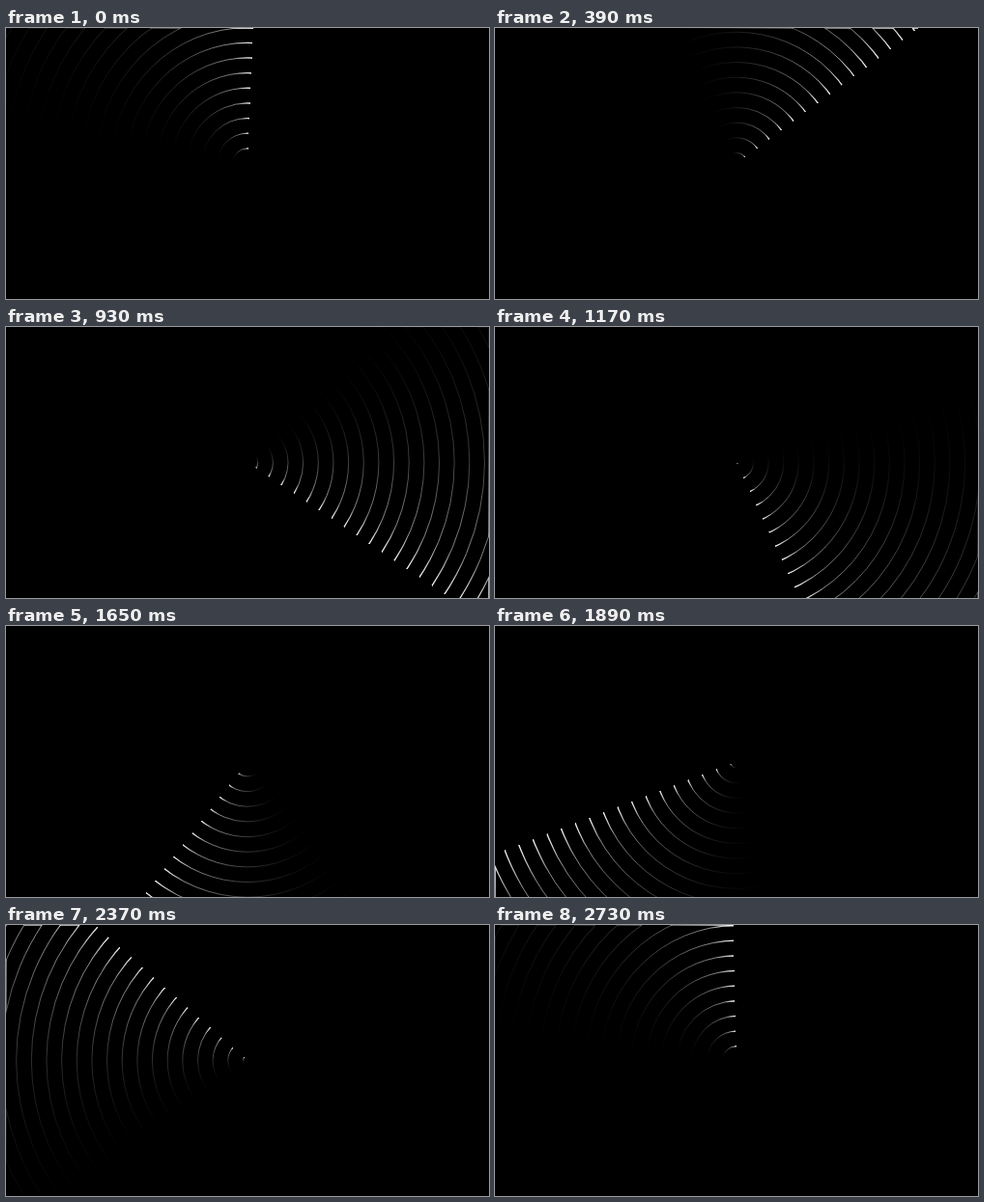
These frames come from a looping animation (500x281 px, 2.76 s). An HTML page with a canvas:

```html
<!DOCTYPE html>
<html lang="en">
<head>
<meta charset="utf-8">
<title>Radar rings</title>
<style>
  html, body { margin: 0; width: 100%; height: 100%; overflow: hidden; background: #000; }
  canvas { display: block; width: 100vw; height: 100vh; }
</style>
</head>
<body>
<canvas id="stage" width="500" height="281"></canvas>
<script>
const ctx = document.getElementById('stage').getContext('2d');
const W = 500, H = 281, CX = 250, CY = 140.5;
const STEP = 30, STEPS = 92;
const GAP = 15.65;          // distance between rings
const CYCLES = 5;           // ring gaps travelled per loop
const START = 2.5;          // first head angle, clockwise from the top
const TAIL = 90, TIP = 10;  // degrees behind the head
const RAD = Math.PI / 180;

// White that fades out over `span` degrees behind the head.
function fade(head, span, peak, power) {
  const gradient = ctx.createConicGradient(head, CX, CY);
  const start = 1 - span / 360;
  gradient.addColorStop(0, 'rgba(255,255,255,0)');
  for (let i = 0; i <= 12; i++) {
    const u = i / 12;
    gradient.addColorStop(start + (1 - start) * u, `rgba(255,255,255,${peak * u ** power})`);
  }
  return gradient;
}

function strokeRing(radius, width, style) {
  ctx.beginPath();
  ctx.arc(CX, CY, radius, 0, 2 * Math.PI);
  ctx.lineWidth = width;
  ctx.strokeStyle = style;
  ctx.stroke();
}

// Every second gap is a band; its outline follows the stage border where it is cut off.
function strokeBorder(radii, travel, style) {
  ctx.save();
  ctx.beginPath();
  radii.forEach((r, k) => {
    if ((k - Math.floor(travel)) % 2) return;
    for (const edge of [r, r + GAP]) {
      ctx.moveTo(CX + edge, CY);
      ctx.arc(CX, CY, edge, 0, 2 * Math.PI);
    }
  });
  ctx.clip('evenodd');
  ctx.lineWidth = 1;
  ctx.strokeStyle = style;
  ctx.strokeRect(0.5, 0.5, W - 1, H + 10);
  ctx.restore();
}

function draw(step) {
  const turn = step / STEPS;
  const travel = CYCLES * turn;
  const head = (START + 360 * turn - 90) * RAD;
  const tail = fade(head, TAIL, 0.72, 2.2);
  const tip = fade(head, TIP, 0.85, 1);
  const radii = Array.from({ length: 20 }, (_, k) => GAP * (k + travel % 1));

  ctx.fillStyle = '#000';
  ctx.fillRect(0, 0, W, H);
  for (const r of radii) {
    if (r < 0.5) continue;
    strokeRing(r, 1, tail);
    strokeRing(r, 1.3, tip);
  }
  strokeBorder(radii, travel, tail);
}

const begin = performance.now();
function tick() {
  draw(Math.floor((performance.now() - begin) / STEP) % STEPS);
  requestAnimationFrame(tick);
}
tick();
</script>
</body>
</html>
```
